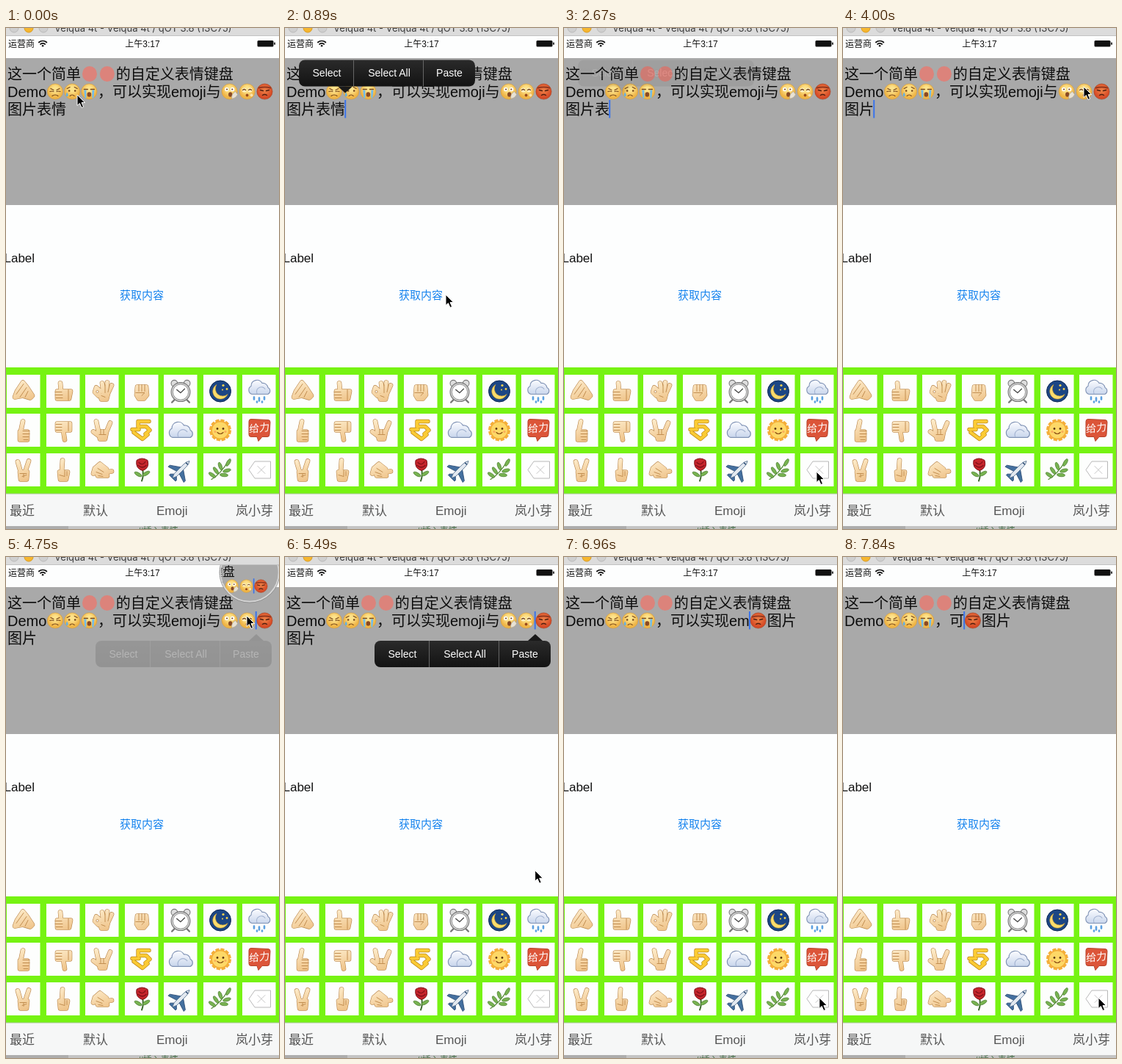
An HTML page for the animation above (7990 ms loop, 372 by 682 pixels).

```html
<!DOCTYPE html>
<html lang="zh-CN">
<head>
<meta charset="utf-8">
<style>
  html, body { margin: 0; width: 372px; height: 682px; overflow: hidden; background: #fdfefe; }
  svg { display: block; font-family: "Liberation Sans", "Noto Sans CJK SC", "Noto Sans CJK", sans-serif; }
</style>
</head>
<body>
<svg id="stage" width="372" height="682" viewBox="0 0 372 682"></svg>
<script>
const LOOP = 7990, TICKS = 54;
const FONT = '20px "Liberation Sans", "Noto Sans CJK SC", "Noto Sans CJK", sans-serif';
const stage = document.getElementById('stage');
const $ = id => document.getElementById(id);

const at = (x, y, body, scale = 1) => `<g transform="translate(${x} ${y}) scale(${scale})">${body}</g>`;
const rect = (x, y, w, h, fill, more = '') => `<rect x="${x}" y="${y}" width="${w}" height="${h}" fill="${fill}" ${more}/>`;
const disc = (x, y, r, fill, more = '') => `<circle cx="${x}" cy="${y}" r="${r}" fill="${fill}" ${more}/>`;
const shape = (d, fill, more = '') => `<path d="${d}" fill="${fill}" ${more}/>`;
const line = (d, color, w = 1, fill = 'none') => `<path d="${d}" fill="${fill}" stroke="${color}" stroke-width="${w}" stroke-linecap="round" stroke-linejoin="round"/>`;
const label = (x, y, size, fill, str, more = '') => `<text x="${x}" y="${y}" font-size="${size}" fill="${fill}" ${more}>${str}</text>`;

// Key icons, drawn around the centre of a key
const hand = (d, folds) => line(d, '#b98549', 6.6) + line(d, 'url(#skin)', 5.4, 'url(#skin)') + line(folds, '#c28e50', 1);
const cloud = shape('M-10 9a6 6 0 0 1-1-11a8 8 0 0 1 15-4a7 7 0 0 1 8 6a5 5 0 0 1 0 9z', 'url(#mist)', 'stroke="#7f92b4" stroke-width="1.1"') +
  line('M-3 8a6 6 0 0 1 3-8a6 6 0 0 1 8 2', '#a5b5d2', 1.1);
const leaf = (x, y, a) => `<ellipse rx="5.5" ry="2.2" fill="#78b351" stroke="#4b7f30" stroke-width=".7" transform="translate(${x} ${y}) rotate(${a})"/>`;
const clock = at(0, 0, line('M-8 11l-3 3M8 11l3 3', '#777', 2) + disc(-8, -10, 4, '#dedede', 'stroke="#777"') + disc(8, -10, 4, '#dedede', 'stroke="#777"') +
  disc(0, 1, 12, '#d2d2d2', 'stroke="#777"') + disc(0, 1, 9.8, '#fff', 'stroke="#888" stroke-width=".8"') + line('M-5 -2L0 2L5 -3', '#444', 1.2), 1.08);
const moon = disc(0, 0, 14.5, '#1c4684', 'stroke="#0e2a58"') + shape('M-5 -9a10.5 10.5 0 1 0 15 13a10 10 0 0 1-15-13z', '#fbdc6c', 'stroke="#c99a2e" stroke-width=".6"') +
  disc(4, -8, 1.6, '#fbd34d') + disc(9, -3, 1.4, '#fbd34d') + disc(3, -2, 1, '#fbd34d');
const rain = at(0, -5, cloud) + line('M-7 8v3M0 9v4M7 8v3M-3 14v1M4 14v1', '#5b9fe0', 2.6);
const five = ['#bf8a1b', '#fbcb34'].map((c, i) => line('M10 -12H-5V-5H6L11 0L5 5M-13 -1H-4M-11 3L1 12L8 6', c, i ? 4 : 5.4)).join('');
const sun = `<circle r="13" fill="#f4ae39" stroke="#f4ae39" stroke-width="4" stroke-dasharray="5 1.8"/>` + disc(0, 0, 11, '#fdd867') +
  disc(-4, -2, 1.4, '#5b3413') + disc(4, -2, 1.4, '#5b3413') + line('M-4 3q4 4 8 0', '#8b4c14', 1.1) + disc(-7, 2, 1.6, '#f9ac5b') + disc(7, 2, 1.6, '#f9ac5b');
const bubble = shape('M-11 -15L12 -14q3 0 3 3L14 6q0 3-3 3H4L-1 15L-3 9H-11q-3 0-3-3V-12q0-3 3-3z', '#dc5539', 'stroke="#b5432a"') +
  label(0, 2, 14, '#fff', '给力', 'text-anchor="middle" font-weight="500" transform="rotate(-6) skewX(-8)"');
const rose = line('M1 -2Q3 8 0 15', '#3e6b2d', 2) + leaf(-5, 6, 30) + leaf(6, 5, -30) +
  shape('M-7 -13Q0 -18 8 -13Q11 -2 1 1Q-9 -2-7 -13z', '#c6252c', 'stroke="#7d1016"') + line('M-4 -10Q1 -5 5 -11M-5 -6Q1 -1 6 -6', '#7d1016', 1.2);
const plane = '<g transform="rotate(45)">' + shape('M-2 -3L-15 6V9L-2 5ZM2 -3L15 6V9L2 5ZM-2 10L-6 14V16H6V14L2 10Z', '#44709f', 'stroke="#2a4a73" stroke-width=".8"') +
  shape('M0 -17Q2.5 -14 2.5 -8V10L0 16L-2.5 10V-8Q-2.5 -14 0 -17z', '#e3e9f0', 'stroke="#53708f" stroke-width=".8"') + line('M-1.5 -12H1.5', '#27486f', 1.5) + '</g>';
const twig = line('M-12 13Q0 6 11 -12', '#568b37', 1.4) + leaf(11, -10, -60) + leaf(0, -5, 70) + leaf(-6, 1, 55) + leaf(9, 1, -15) + leaf(5, 7, 5) + leaf(-11, 7, 35);
const erase = shape('M-14 0L-6 -11.5H15.5V11.5H-6Z', '#fff', 'stroke="#b8b8b8"') + line('M-2 -5L8 5M8 -5L-2 5', '#c6c6c6');

const keys = [
  hand('M-12 8L-9 0L-1 -12L4 -6L12 6L9 9L-1 6Z', 'M-10 4L0 -10M-5 8L4 -5M2 8L6 0'),
  hand('M-8 0H10L8 10H-8ZM-3 0L-4 -11', 'M-11 1H-2M-11 5H-1M-10 9H-1M7 -2V12'),
  hand('M-3 5L-1 11H6L8 3L13 -8M5 3L7 -12M2 3L0 -11M-5 6L-10 1L-8 -5L-2 0', 'M4 2V-9M8 1L10 -8M-1 6L4 8') + disc(-6.5, .5, 1.6, '#fff', 'stroke="#b98549" stroke-width=".8"'),
  hand('M-6 -6H6L7 5L3 10H-4L-7 5Z', 'M-4 -9V0M0 -9V0M4 -9V0M-8 2H4L0 6'),
  clock, moon, rain,
  hand('M-5 2H5V13H-5ZM-4 2L-1 -12', 'M-1 1H8M-1 5H8M-1 9H7M0 13H6'),
  hand('M-8 -9H9V0H-8ZM0 0L2 13', 'M-10 -8H-2M-10 -4H-2M-10 0H-2M7 -11V1'),
  hand('M-5 2H6L4 12H-3ZM-5 2L-8 -12M6 2L11 -10M-4 8L-12 2', 'M-2 -1V5M2 -1V5M-4 6H5'),
  five, at(0, 0, cloud, 1.1), sun, bubble,
  hand('M-5 3H5L4 13H-4ZM-4 3L-8 -11M2 3L7 -12', 'M-5 5H4M0 5V10M-2 9L4 7'),
  hand('M-5 3H6L4 13H-4ZM-2 2L-1 -13', 'M2 1V8M5 2V8M-5 7L2 9'),
  hand('M-10 -2L-3 -8L6 -1L7 8H-6ZM6 3L13 2M-10 -2L-12 5', 'M-6 -2L2 3M-8 3L0 6M-5 8L1 9'),
  rose, plane, twig, erase
];

// Inline faces, one per digit of the message
const face = body => disc(0, 0, 10.6, 'url(#yellow)', 'stroke="#d39a3c" stroke-width=".6"') + body;
const ink = '#75451a';
const eyes = disc(-4, -3, 2.7, '#fff') + disc(4, -3, 2.7, '#fff') + disc(-3.6, -3, 1.1, ink) + disc(3.6, -3, 1.1, ink);
const faces = {
  1: '<ellipse rx="10" ry="10.5" fill="#dc837b"/>',
  2: face(line('M-6 -4L-2 -2M6 -4L2 -2M-7 0Q-4 -1-2 0M7 0Q4 -1 2 0M-4 6Q0 3 4 6', ink, 1.2)),
  3: face(line('M-7 -4L-3 -6M7 -4L3 -6M-3 6Q0 3 3 6', ink, 1.1) + disc(-4, -1, 1.3, ink) + disc(4, -1, 1.3, ink) + shape('M-7 1q-3 5 0 6q3 -1 0 -6', '#62b0e6')),
  4: face(line('M-7 -3H-2M7 -3H2', ink, 1.3) + shape('M-7 -2h3V9h-2zM7 -2h-3V9h2z', '#6fbcee') + '<ellipse cy="4" rx="2.8" ry="3.2" fill="#8a4a24"/>'),
  5: face(eyes + '<ellipse cx="1" cy="4" rx="2.6" ry="3.2" fill="#8a4a24"/>' + shape('M3 10Q2 3 8 0L11 4Q9 9 3 10z', '#e8e2d4', 'stroke="#a89c85" stroke-width=".6"')),
  6: face(disc(-4, -2, 3, '#fdf0c4') + disc(4, -2, 3, '#fdf0c4') + line('M-6 -2Q-4 -4-2 -2M2 -2Q4 -4 6 -2', ink, 1.2) + disc(0, 5, 1.9, '#9a4a1d') + disc(6, 5, 2, '#fbe3ae')),
  7: disc(0, 0, 10.6, 'url(#red)', 'stroke="#a5401f" stroke-width=".6"') + line('M-8 -5Q0 -7 8 -5', '#94391f', 2) +
     line('M-6 -2L-2 -1M6 -2L2 -1M-3 5Q0 3 3 5', '#4f1f10', 1.4)
};

const menu = (id, x, y, tip) => `<g id="${id}">` + at(x, y,
  rect(0, 0, 240, 36, 'url(#dark)', 'rx="8"') + shape(tip, '#191919') + rect(74, 0, 1, 36, '#666') + rect(169, 0, 1, 36, '#666') +
  ['Select', 'Select All', 'Paste'].map((s, i) => label([38, 123, 205][i], 22.5, 14, '#fff', s, 'text-anchor="middle"')).join('')) + '</g>';

const tiles = keys.map((art, i) => {
  const x = Math.round(1 + i % 7 * 53.57), y = Math.round(471.7 + Math.floor(i / 7) * 53.6);
  return rect(x, y, 45.5, 45, '#fdfefd') + at(x + 23, y + 22.5, art);
}).join('');

stage.innerHTML = `<defs>
  <radialGradient id="yellow" cy=".35"><stop offset=".3" stop-color="#fde28a"/><stop offset="1" stop-color="#efb547"/></radialGradient>
  <radialGradient id="red" cy=".4"><stop offset=".2" stop-color="#ea7a42"/><stop offset="1" stop-color="#d64a26"/></radialGradient>
  <linearGradient id="skin" gradientUnits="userSpaceOnUse" x1="-6" y1="-15" x2="6" y2="16"><stop stop-color="#fdeccb"/><stop offset="1" stop-color="#eec084"/></linearGradient>
  <linearGradient id="mist" x2="0" y2="1"><stop stop-color="#fbfcff"/><stop offset="1" stop-color="#c9d6ec"/></linearGradient>
  <linearGradient id="dark" x2="0" y2="1"><stop stop-color="#2a2a2a"/><stop offset="1" stop-color="#131313"/></linearGradient>
  <clipPath id="lens"><circle r="60"/></clipPath>
  <clipPath id="screen"><rect y="11" width="372" height="667"/></clipPath></defs>` +
  rect(0, 0, 372, 682, '#fdfefe') + rect(0, 0, 372, 11, '#dcdcdc') + rect(0, 10, 372, 1, '#c2c2c2') +
  disc(11, 0, 6, '#cfcfcf', 'stroke="#b9b9b9"') + disc(31, 0, 6, '#f6b62f', 'stroke="#d99a20"') + disc(51, 0, 6, '#cfcfcf', 'stroke="#b9b9b9"') +
  label(66, 4.5, 13, '#3c3c3c', 'Velqua 4t - Velqua 4t / qOT 3.8 (13C75)', 'font-family="Inter, sans-serif"') +
  label(3, 25.5, 12, '#111', '运营商') + label(186, 25.5, 12, '#111', '上午3:17', 'text-anchor="middle" font-weight="500"') +
  line('M44.8 19.5a8 8 0 0 1 10.6 0M47 22a5 5 0 0 1 6.2 0', '#111', 1.7) + disc(50.1, 24.3, 1.3, '#111') +
  rect(342.5, 17, 22, 8.5, '#111', 'rx="1.5"') + rect(365.3, 19.5, 1.6, 3.5, '#111', 'rx=".8"') +
  rect(0, 41, 372, 200, '#a9a9a9') + '<g id="message"></g>' +
  label(-2.5, 319, 17, '#111', 'Label') + label(185, 369, 15, '#1583ee', '获取内容', 'text-anchor="middle"') +
  rect(0, 462, 372, 172, '#76f312') + tiles +
  rect(0, 634, 372, 44, '#f6f7f7') + rect(0, 633.5, 372, 1, '#a9c796') +
  ['最近', '默认', 'Emoji', '岚小芽'].map((s, i) => label([5, 105, 205, 313][i], 662.5, 17, '#555', s)).join('') +
  rect(0, 678, 372, 4, '#c4c4c4') + rect(0, 678, 85, 4, '#adadad') + label(180, 689, 12, '#4d7350', '//插入表情') +
  menu('menuA', 19, 43.5, 'M53 36L63 45L73 36z') + menu('menuB', 122, 114, 'M209 0L219 -9L229 0z') +
  `<g clip-path="url(#screen)"><g id="loupe"><g clip-path="url(#lens)">${disc(0, 0, 60, '#a9a9a9')}
    <use href="#message" transform="translate(7.4 28) scale(1.22) translate(-340 -87)"/></g>
    <circle r="58.5" fill="none" stroke="#d6d6d6" stroke-width="3"/><circle r="60.5" fill="none" stroke="#858585"/></g></g>` +
  `<g id="mouse">${shape('M0 0V14.5L3.4 11.5L6 17.5L8.6 16.4L6 10.6H10.6Z', '#000', 'stroke="#fff" stroke-width="1"')}</g>`;

// Piecewise linear keys: [tick, value, ...]
function key(list, k) {
  const i = list.findIndex(p => p[0] > k);
  if (i < 0) return list.at(-1).slice(1);
  if (!i) return list[0].slice(1);
  const a = list[i - 1], b = list[i], f = (k - a[0]) / (b[0] - a[0]);
  return a.slice(1).map((v, n) => v + (b[n + 1] - v) * f);
}
const PATH = [[0, 97, 91], [2, 97, 91], [6, 219, 363], [8, 222, 366], [14, 352, 557], [15, 352, 557], [16, 344, 604], [20, 344, 604],
  [23, 331, 114], [27, 328, 80], [33, 328, 80], [39, 347, 600], [48, 348, 600]];
const MENU_A = [[2, 0], [4, 1], [16, 1], [18, .07], [19, 0]];
const MENU_B = [[31, 0], [32, .14], [33, 1], [39, 1], [40, .35], [41, 0]];
const LOUPE = [[29, 0], [30, 1], [31, 1], [32, .68], [33, 0]];

const TEXT = '这一个简单11的自定义表情键盘\nDemo234，可以实现emoji与567图片表情';
const FOCUS = 2, TAP = 30;
const EDITS = [17, 20, TAP, 40, 42, 43, 45, 46, 47, 49, 50, 51, 52, 53];
const pen = document.createElement('canvas').getContext('2d');
pen.font = FONT;
const widthOf = c => !faces[c] ? pen.measureText(c).width : '234'.includes(c) ? 23.2 : 23.9;

function message(k) {
  const chars = [...TEXT];
  let caret = chars.length, last = FOCUS, x = 2, y = 70, out = '';
  for (const e of EDITS.filter(e => e <= k)) {
    last = e;
    if (e === TAP) caret = chars.indexOf('6') + 1;
    else chars.splice(--caret, 1);
  }
  const mark = () => {
    if (k >= FOCUS && (k - last) % 7 < 5) out += rect(x - .8, y - 20, 2, 24.5, '#3b74ea');
  };
  chars.forEach((c, i) => {
    const w = c === '\n' ? 0 : widthOf(c);
    if (c === '\n' || x + w > 368) { x = 2; y += 24; }
    if (i === caret) mark();
    if (faces[c]) out += at(x + w / 2, y - 7.5, faces[c]);
    else if (w) out += label(x, y, 20, '#0c0c0c', c);
    x += w;
  });
  if (caret === chars.length) mark();
  return out;
}

let shown = -1;
function draw(now) {
  const k = Math.floor(((now % LOOP) + 5) / LOOP * TICKS) % TICKS;
  if (k !== shown) {
    shown = k;
    $('message').innerHTML = message(k);
    $('mouse').setAttribute('transform', `translate(${key(PATH, k)})`);
    $('menuA').setAttribute('opacity', key(MENU_A, k));
    $('menuB').setAttribute('opacity', key(MENU_B, k));
    const size = key(LOUPE, k)[0];
    $('loupe').setAttribute('transform', `translate(332 21) scale(${size})`);
    $('loupe').setAttribute('visibility', size ? 'visible' : 'hidden');
  }
}
const start = performance.now();
function loop() {
  draw(performance.now() - start);
  requestAnimationFrame(loop);
}
loop();
</script>
</body>
</html>
```
